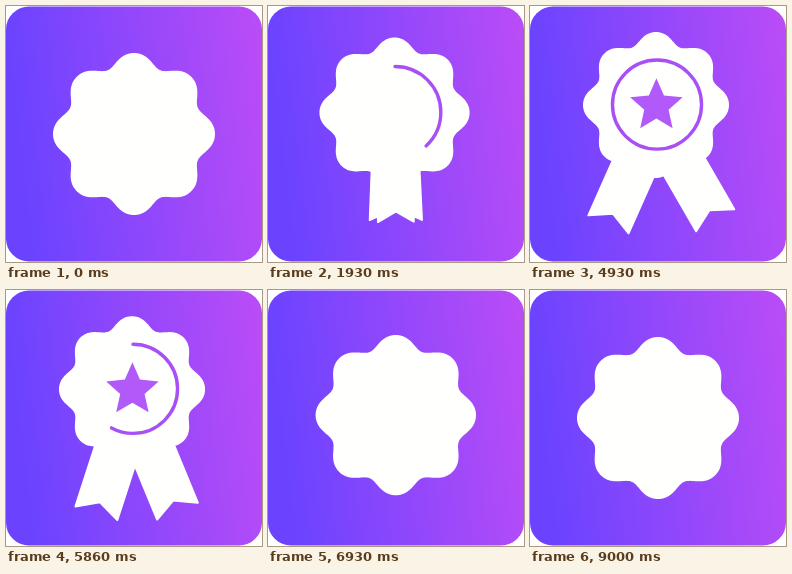
An HTML page that plays this animation: 256x256 px, repeating every 9130 ms.

```html
<!DOCTYPE html>
<html lang="en">
<head>
<meta charset="utf-8">
<title>Award rosette</title>
<style>
  html, body { margin: 0; width: 100%; height: 100%; overflow: hidden; background: #fff; }
  svg { display: block; width: 100vw; height: 100vh; }
</style>
</head>
<body>
<svg viewBox="0 0 256 256">
  <defs>
    <linearGradient id="card" gradientUnits="userSpaceOnUse" x1="14" y1="144" x2="260" y2="114">
      <stop offset="0" stop-color="#6b43ff"/>
      <stop offset="1" stop-color="#b84cf7"/>
    </linearGradient>
  </defs>
  <rect y="0.4" width="256" height="255.2" rx="23" fill="url(#card)"/>
  <g fill="#fffffe" stroke="#fffffe" stroke-width="2" stroke-linejoin="round">
    <path id="left"/>
    <path id="right"/>
  </g>
  <path id="rosette" fill="#fffffe"/>
  <circle id="ring" fill="none" stroke="#a84ff6" stroke-width="3.4" stroke-linecap="round" pathLength="100"/>
  <path id="star" fill="#b25af9"/>
</svg>
<script>
const LOOP = 9130;
const [left, right, rosette, ring, star] =
  ['left', 'right', 'rosette', 'ring', 'star'].map(id => document.getElementById(id));

// When each property enters and leaves: [in start, in end, out start, out end]
const TIMES = {
  lift: [930, 2530, 5730, 7330],
  drop: [1100, 2340, 5920, 7160],
  spread: [1690, 2690, 5530, 6430],
  ring: [1500, 2480, 5530, 6250],
  star: [2100, 2860, 6030, 6630]
};

const lerp = (a, b, p) => a + (b - a) * p;

function ease(t, from, to) {
  const u = Math.min(1, Math.max(0, (t - from) / (to - from)));
  return u * u / (u * u + (1 - u) * (1 - u));
}

function level(name, t) {
  const [a, b, c, d] = TIMES[name];
  return ease(t, a, b) - ease(t, c, d);
}

// Closed path around the origin; angle 0 points up.
function polar(count, radius) {
  let d = '';
  for (let i = 0; i < count; i++) {
    const a = i / count * 2 * Math.PI, r = radius(a, i);
    d += `${i ? 'L' : 'M'}${(r * Math.sin(a)).toFixed(2)} ${(-r * Math.cos(a)).toFixed(2)}`;
  }
  return d + 'Z';
}

rosette.setAttribute('d', polar(320, a => 75.6 + 6 * Math.cos(8 * a) - 0.6 * Math.cos(16 * a)));
star.setAttribute('d', polar(10, (a, i) => i % 2 ? 12.8 : 27.6));

function ribbon(el, x, y, angle, length) {
  const half = 22, end = length - 1;
  el.setAttribute('d', `M${-half} -20H${half}V${end}L0 ${end - 11.5}L${-half} ${end}Z`);
  el.setAttribute('transform', `translate(${x} ${y}) rotate(${angle})`);
}

function draw(t) {
  const lift = level('lift', t), spread = level('spread', t);
  const length = 113 * level('drop', t);
  const x = lerp(128, 126, lift), y = lerp(128, 99, lift), r = lerp(81, 73, lift);

  rosette.setAttribute('transform', `translate(${x} ${y}) scale(${r / 81})`);
  ribbon(left, lerp(127.5, 124, spread), y + lerp(18.5, 17, spread), 24 * spread, length);
  ribbon(right, lerp(127.5, 129.2, spread), y + lerp(18.5, 18.3, spread), -30 * spread, length);

  const drawn = level('ring', t);
  ring.setAttribute('r', r * 0.61);
  ring.setAttribute('transform', `translate(127 ${y - 0.4}) rotate(-90)`);
  ring.setAttribute('stroke-dasharray', drawn > 0.999 ? 'none' : `${drawn * 100} 200`);
  ring.setAttribute('visibility', drawn > 0.002 ? 'visible' : 'hidden');

  star.setAttribute('transform', `translate(126.4 ${lerp(117, 99.8, lift)})`);
  star.setAttribute('opacity', level('star', t));
}

const start = performance.now();
function tick() {
  draw((performance.now() - start) % LOOP);
  requestAnimationFrame(tick);
}
tick();
</script>
</body>
</html>
```
